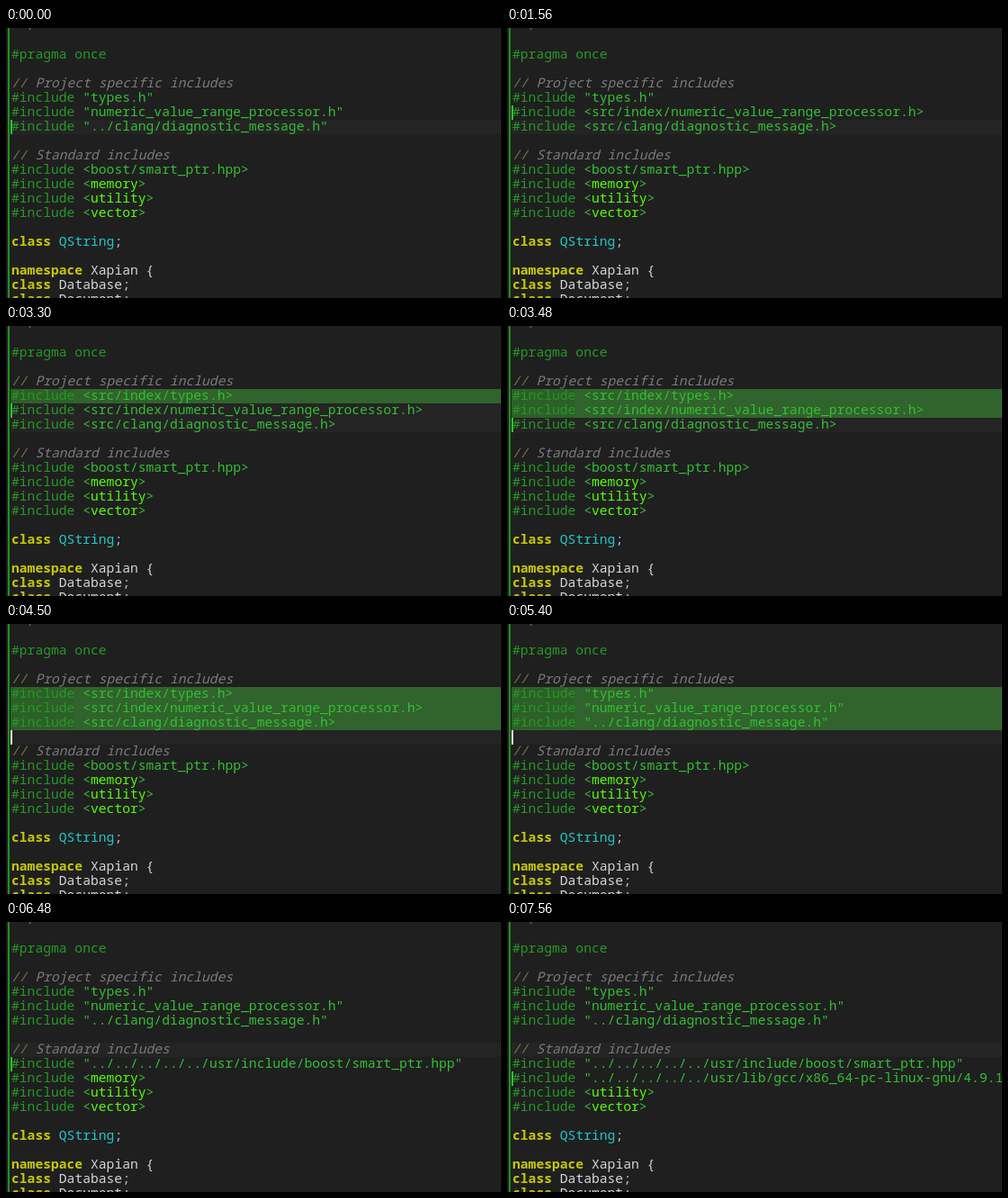
An HTML page with a canvas for the animation above (8 s loop, 550 px wide and 300 px high).

```html
<!DOCTYPE html>
<html lang="en">
<head>
<meta charset="utf-8">
<title>Include path editing</title>
<style>
html, body { margin: 0; width: 100%; height: 100%; overflow: hidden; background: #1f1f1f; }
canvas { display: block; }
</style>
</head>
<body>
<canvas id="stage" width="550" height="300"></canvas>
<script>
const ctx = document.getElementById('stage').getContext('2d');
const W = 550, H = 300, LOOP = 8000;
const LINE = 16, LEFT = 5, TEXT_X = 6, CHAR = 8.8;
const SIZE = '14.667px "Noto Sans Mono", "DejaVu Sans Mono", monospace';

const color = {
  back: '#1f1f1f', current: '#242424', change: '#209020',
  selection: '#31632c', directiveBox: '#2d5f29',
  directive: '#259925', string: '#33bf33', header: '#55ff00',
  slashes: '#7b7550', comment: '#7a7a7a', keyword: '#c8c800',
  type: '#20c8c8', text: '#d6d6d6', mark: '#a9bfd6', caret: '#f0f0f0'
};

// Rows are counted from the "types.h" include line.
const rowTop = row => 70 + row * LINE;

// A line is a list of [text, style, font prefix].
const include = path => [['#include ', 'directive'], [path, 'string']];
const system = name => [['#include ', 'directive'], ['<', 'string'], [name, 'header'], ['>', 'string']];
const comment = text => [['//', 'slashes', 'italic'], [' ' + text, 'comment', 'italic']];
const declare = (name, style) => [['class ', 'keyword', 'bold'], [name, style], [';', 'mark']];

const fixedLines = new Map([
  [-5, [[' */', 'comment', 'italic']]],
  [-3, [['#pragma once', 'directive']]],
  [-1, comment('Project specific includes')],
  [4, comment('Standard includes')],
  [7, system('utility')],
  [8, system('vector')],
  [10, declare('QString', 'type')],
  [12, [['namespace ', 'keyword', 'bold'], ['Xapian {', 'text']]],
  [13, declare('Database', 'text')],
  [14, declare('Document', 'text')]
]);

const up = '../../../../../usr/';
const relative = [
  include('"types.h"'),
  include('"numeric_value_range_processor.h"'),
  include('"../clang/diagnostic_message.h"')
];
const absolute = [
  include('<src/index/types.h>'),
  include('<src/index/numeric_value_range_processor.h>'),
  include('<src/clang/diagnostic_message.h>')
];
const absoluteFrom = [2280, 1560, 420];
const absoluteUntil = 4830;

// [start, caret row, or null while blinked off]
const caretSteps = [
  [0, 2], [90, null], [420, 2], [870, null], [1140, 1], [1920, 0],
  [2730, null], [3180, 0], [3300, 1], [3480, 2], [3600, 3],
  [4050, null], [4500, 3], [4950, null], [5400, 3], [5700, 4],
  [5850, 5], [6270, null], [6480, 5], [6900, null], [7200, 6]
];
const selectedSteps = [[0, 0], [3300, 1], [3480, 2], [3600, 3], [5700, 0]];
const currentSteps = [[0, [2]], [3300, [1, 2]], [3480, [2]], [3600, [3]], [5700, [4]]];

function valueAt(steps, t) {
  let value;
  for (const [start, v] of steps) if (t >= start) value = v;
  return value;
}

function fill(style, x, y, w, h) {
  ctx.fillStyle = color[style];
  ctx.fillRect(x, y, w, h);
}

function drawLine(row, parts) {
  let col = 0;
  for (const [text, style, face = ''] of parts) {
    ctx.font = `${face} ${SIZE}`;
    ctx.fillStyle = color[style];
    ctx.fillText(text, TEXT_X + col * CHAR, rowTop(row) + 12);
    col += text.length;
  }
}

function caretStyle(row) {
  if (row === 3) return 'caret';
  return row === 4 ? 'slashes' : 'string';
}

function draw(t) {
  fill('back', 0, 0, W, H);
  for (const row of valueAt(currentSteps, t)) fill('current', LEFT, rowTop(row), W - LEFT, LINE);

  const selected = valueAt(selectedSteps, t);
  for (let row = 0; row < selected; row++) {
    fill('selection', LEFT, rowTop(row), W - LEFT, LINE);
    fill('directiveBox', LEFT, rowTop(row), 70, LINE);
  }
  fill('change', 2, 0, 2, H);

  fixedLines.forEach((parts, row) => drawLine(row, parts));
  relative.forEach((parts, row) => {
    const swapped = t >= absoluteFrom[row] && t < absoluteUntil;
    drawLine(row, swapped ? absolute[row] : parts);
  });
  drawLine(5, include(t < 6480 ? '<boost/smart_ptr.hpp>' : `"${up}include/boost/smart_ptr.hpp"`));
  drawLine(6, t < 7560 ? system('memory') : include(`"${up}lib/gcc/x86_64-pc-linux-gnu/4.9.1/include/memory"`));

  const caret = valueAt(caretSteps, t);
  if (caret !== null) fill(caretStyle(caret), LEFT, rowTop(caret), 2, LINE);
}

const begin = performance.now();
function tick() {
  draw((performance.now() - begin) % LOOP);
  requestAnimationFrame(tick);
}
tick();
</script>
</body>
</html>
```
